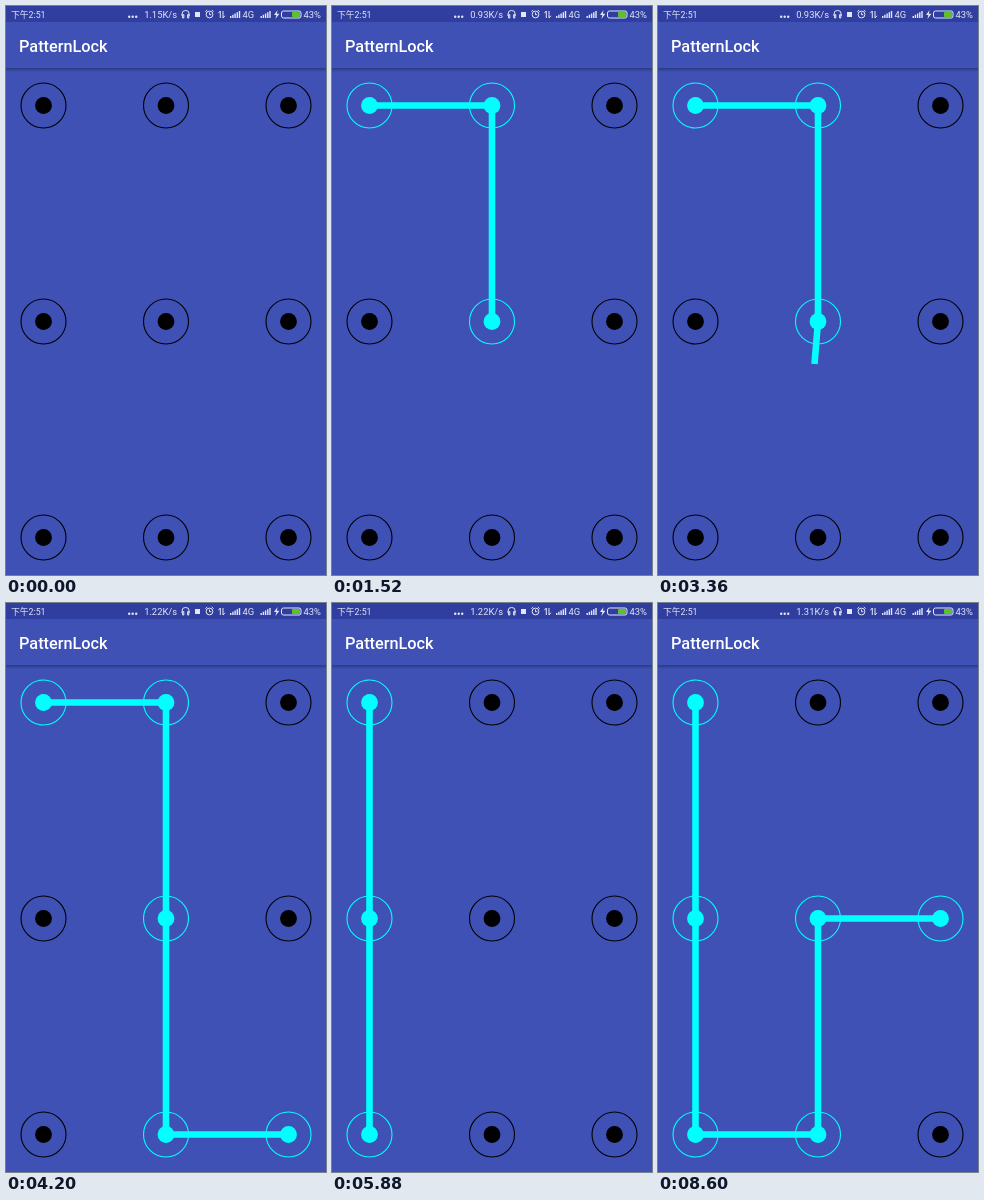
Animation of 320 by 569 pixels, one loop 9080 ms. Source, as an HTML page:

```html
<!DOCTYPE html>
<html lang="en">
<head>
<meta charset="utf-8">
<title>PatternLock</title>
<style>
  html, body { margin: 0; width: 100%; height: 100%; overflow: hidden; background: #3f51b5; }
  svg { display: block; width: 100%; height: 100%; }
  text { font-family: Roboto, "Noto Sans CJK SC", "Noto Sans CJK", sans-serif; }
  .status { fill: #e3e6f5; font-size: 9.4px; }
  .icon { fill: none; stroke: #e3e6f5; stroke-width: 1; }
  .title { fill: #fff; font-size: 16.3px; font-weight: 500; }
  .ring { fill: none; stroke: #000; stroke-width: 1.1; }
  .on .ring { stroke: #0ff; }
  .on .dot { fill: #0ff; }
  #trail { fill: none; stroke: #0ff; stroke-width: 6.6; stroke-linejoin: bevel; }
</style>
</head>
<body>
<svg viewBox="0 0 320 569">
  <defs>
    <linearGradient id="shade" x2="0" y2="1">
      <stop offset="0" stop-opacity=".3"/>
      <stop offset="1" stop-opacity="0"/>
    </linearGradient>
    <path id="bars" d="M0 12v-2h1.4v2zM2.2 12v-3.2h1.4v3.2zM4.4 12v-4.4h1.4v4.4zM6.6 12v-5.7h1.4v5.7zM8.8 12v-7h1.4v7z"/>
  </defs>

  <rect width="320" height="569" fill="#3f51b5"/>
  <rect y="62" width="320" height="4" fill="url(#shade)"/>
  <rect width="320" height="16" fill="#303f9f"/>

  <g class="status">
    <text x="5" y="12" style="font-size:8.8px">下午2:51</text>
    <circle cx="123.2" cy="10.8" r="1.2"/>
    <circle cx="126.7" cy="10.8" r="1.2"/>
    <circle cx="130.2" cy="10.8" r="1.2"/>
    <text id="speed" x="171" y="12" text-anchor="end"></text>
    <rect x="189" y="6" width="5" height="5"/>
    <use href="#bars" x="224"/>
    <text x="236.5" y="12">4G</text>
    <use href="#bars" x="254.5"/>
    <path d="M271.6 4l-3.6 5h2.4l-1 4 4-5.2h-2.6z"/>
    <text x="297.5" y="12">43%</text>
  </g>
  <g class="icon">
    <path d="M176 10v-2a3.6 3.6 0 0 1 7.2 0v2M176.6 8.6v3.4h1.2v-3.4zM181.6 8.6v3.4h1.2v-3.4z"/>
    <circle cx="203.5" cy="8.5" r="3.4"/>
    <path d="M203.5 6.5v2.2h1.8M199.4 5.6l1.8-1.6M207.6 5.6l-1.8-1.6"/>
    <path d="M214.3 12v-7l-1.9 2.2M217 5v7l1.9-2.2"/>
    <rect x="275.5" y="5" width="19.5" height="7" rx="2"/>
  </g>
  <rect x="286" y="6" width="8" height="5" rx="1" fill="#5cc22a"/>

  <text class="title" x="13" y="46">PatternLock</text>
  <g id="grid"></g>
  <polyline id="trail"/>
</svg>

<script>
  const LOOP = 9080, STEP = 40, HIT = 22.5;
  const COLS = [37.5, 160, 282.5], ROWS = [99.5, 315.5, 531.5];
  const dots = ROWS.flatMap(y => COLS.map(x => [x, y]));

  // Finger strokes as [ms, x, y]; the finger lifts one step after the last point.
  const strokes = [
    [[40, 38, 104], [480, 90, 102], [920, 156, 98], [1060, 161, 103], [1480, 160, 318]],
    [[2520, 39, 112], [2640, 60, 104], [2840, 155, 100], [2900, 160, 112], [3280, 160, 320],
     [3360, 156.5, 358], [3400, 156, 378], [3680, 160, 522], [3740, 174, 531], [3880, 272, 531]],
    [[4920, 38, 108], [5000, 38, 118], [5160, 38, 178], [5480, 37, 315], [5860, 38, 525],
     [5940, 48, 533], [6160, 155, 532], [6220, 160, 520], [6660, 161, 325], [6720, 173, 321],
     [6960, 276, 316]]
  ];
  const speeds = [[0, "1.15K/s"], [240, "0.93K/s"], [4200, "1.22K/s"], [8160, "1.31K/s"]];

  const grid = document.getElementById("grid");
  const trail = document.getElementById("trail");
  const speed = document.getElementById("speed");

  grid.innerHTML = dots.map(([x, y]) =>
    `<g><circle class="ring" cx="${x}" cy="${y}" r="22.5"/><circle class="dot" cx="${x}" cy="${y}" r="8.4"/></g>`
  ).join("");

  function fingerAt(stroke, t) {
    const i = stroke.findIndex(p => p[0] >= t);
    if (i <= 0) return stroke[0].slice(1);
    const [t0, x0, y0] = stroke[i - 1], [t1, x1, y1] = stroke[i];
    const k = (t - t0) / (t1 - t0);
    return [x0 + (x1 - x0) * k, y0 + (y1 - y0) * k];
  }

  // Replays the stroke up to t and collects the dots it has touched.
  function hitsUntil(stroke, t) {
    const hits = new Set();
    for (let s = stroke[0][0]; s <= t; s += STEP) {
      const [x, y] = fingerAt(stroke, s);
      const i = dots.findIndex(d => Math.hypot(d[0] - x, d[1] - y) <= HIT);
      if (i >= 0) hits.add(i);
    }
    return [...hits];
  }

  function draw(t) {
    const stroke = strokes.filter(s => s[0][0] <= t).pop();
    let hits = [], points = [];
    if (stroke) {
      const last = stroke[stroke.length - 1][0];
      hits = hitsUntil(stroke, Math.min(t, last));
      points = hits.map(i => dots[i]);
      if (t <= last) points.push(fingerAt(stroke, t));
    }
    [...grid.children].forEach((g, i) => g.classList.toggle("on", hits.includes(i)));
    trail.setAttribute("points", points.join(" "));
    speed.textContent = speeds.filter(s => s[0] <= t).pop()[1];
  }

  const start = performance.now();
  function tick() {
    const t = (performance.now() - start) % LOOP;
    draw(Math.floor(t / STEP) * STEP);
    requestAnimationFrame(tick);
  }
  tick();
</script>
</body>
</html>
```
